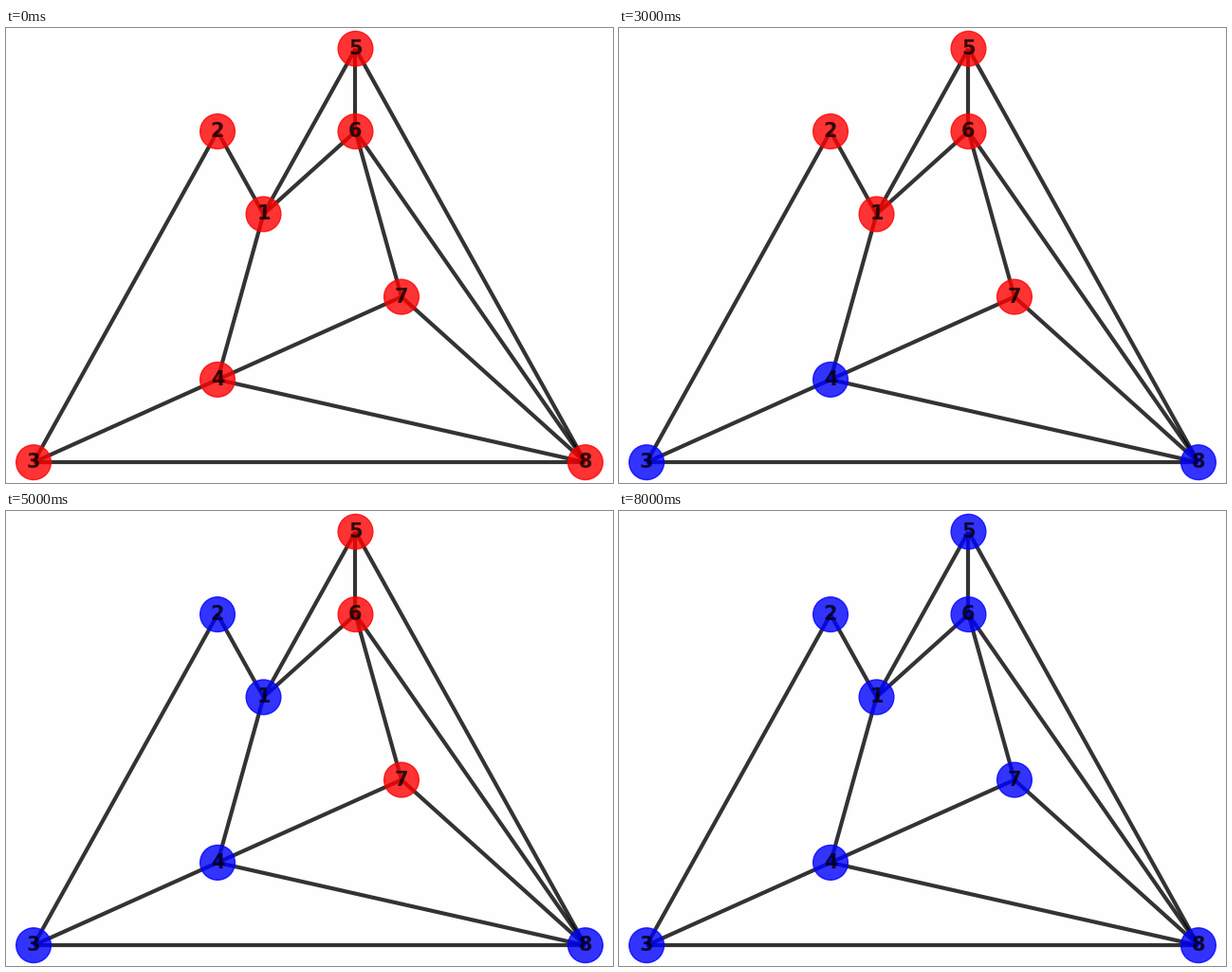
A matplotlib script that plays this animation: 640 by 480 pixels, repeating every 9000 ms.

```python
from itertools import pairwise

import matplotlib.pyplot as plt
from matplotlib.animation import FuncAnimation

ALPHA = 0.8
START = "3"
TRAILS = ["3415832165", "748678"]  # each pair of neighbouring digits is an edge
POINTS = [(5, 3), (4, 4), (0, 0), (4, 1), (7, 5), (7, 4), (8, 2), (12, 0)]
POS = {str(i): point for i, point in enumerate(POINTS, 1)}
EDGES = [edge for trail in TRAILS for edge in pairwise(trail)]


def breadth_first(start):
    """Nodes in the order a breadth-first search reaches them."""
    order = [start]
    for node in order:
        for a, b in EDGES:
            if node in (a, b):
                other = b if node == a else a
                if other not in order:
                    order.append(other)
    return order


VISITS = breadth_first(START)

fig = plt.figure(figsize=(6.4, 4.8), dpi=100, facecolor="#fefefe")
ax = fig.add_axes([0, 0, 1, 1])
ax.axis("off")

for a, b in EDGES:
    ax.plot(*zip(POS[a], POS[b]), color="black", lw=3, alpha=ALPHA,
            solid_capstyle="butt", zorder=1)
nodes = ax.scatter(*zip(*POS.values()), s=700, alpha=ALPHA, zorder=2)
for node, (x, y) in POS.items():
    ax.text(x, y, node, ha="center", va="center", fontsize=15,
            family="DejaVu Sans", weight="bold", alpha=ALPHA, zorder=3)

# 5 % margin around the layout
ax.set_xlim(-0.6, 12.6)
ax.set_ylim(-0.25, 5.25)


def update(step):
    visited = VISITS[:step]
    nodes.set_color(["blue" if node in visited else "red" for node in POS])
    return [nodes]


anim = FuncAnimation(fig, update, frames=len(VISITS) + 1,
                     interval=1000, repeat=True, repeat_delay=0)
plt.show()
```
